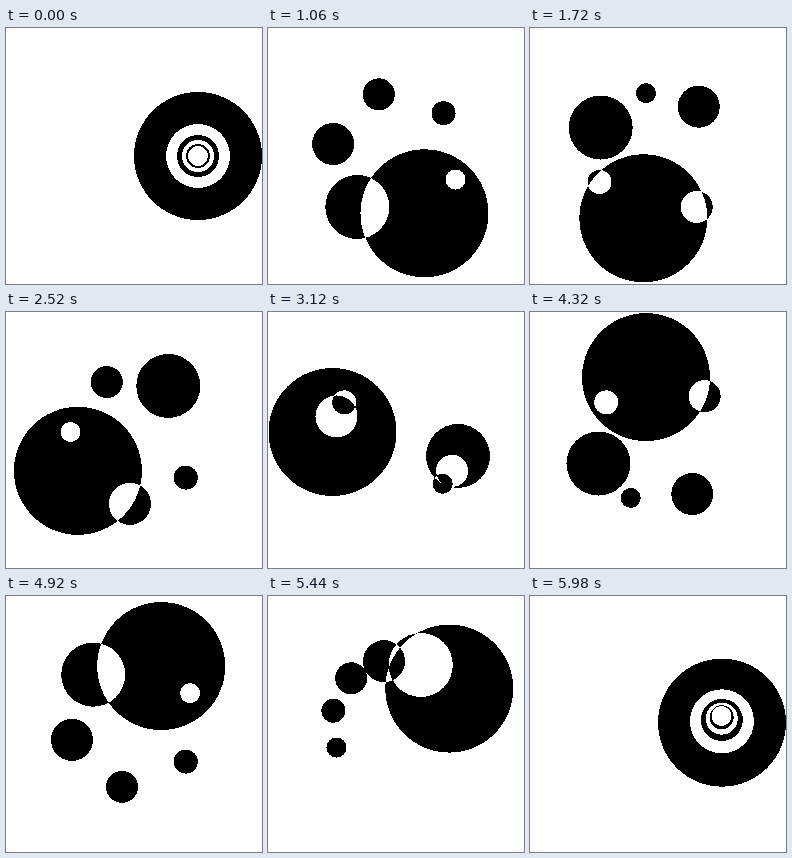
Recreate the animation shown at these times as an HTML page. Size 256 px wide and 256 px high, loop 6 s.

```html
<!DOCTYPE html>
<html lang="en">
<head>
<meta charset="utf-8">
<title>Orbiting circles</title>
<style>
  html, body { margin: 0; width: 100%; height: 100%; overflow: hidden; background: #fff; }
  svg { display: block; width: 100%; height: 100%; }
</style>
</head>
<body>
<svg viewBox="0 0 256 256">
  <path id="discs" fill="#000" fill-rule="evenodd" shape-rendering="crispEdges"/>
</svg>
<script>
  const LOOP = 6000, STEP = 20, COUNT = 6, CENTER = 128, ORBIT = 64;
  const discs = document.getElementById('discs');

  const circle = (x, y, r) =>
    `M${x - r} ${y}a${r} ${r} 0 1 1 ${2 * r} 0a${r} ${r} 0 1 1 ${-2 * r} 0z`;

  // Disc n turns n times per loop and has 1/n of the largest radius.
  function draw(ms) {
    const time = Math.floor((ms % LOOP) / STEP) * STEP;
    let d = '';
    for (let n = 1; n <= COUNT; n++) {
      const angle = 2 * Math.PI * n * time / LOOP;
      d += circle(CENTER + ORBIT * Math.cos(angle),
                  CENTER + ORBIT * Math.sin(angle),
                  Math.floor(ORBIT / n));
    }
    discs.setAttribute('d', d);
  }

  let start;
  function tick(now) {
    start ??= now;
    draw(now - start);
    requestAnimationFrame(tick);
  }
  draw(0);
  requestAnimationFrame(tick);
</script>
</body>
</html>
```
